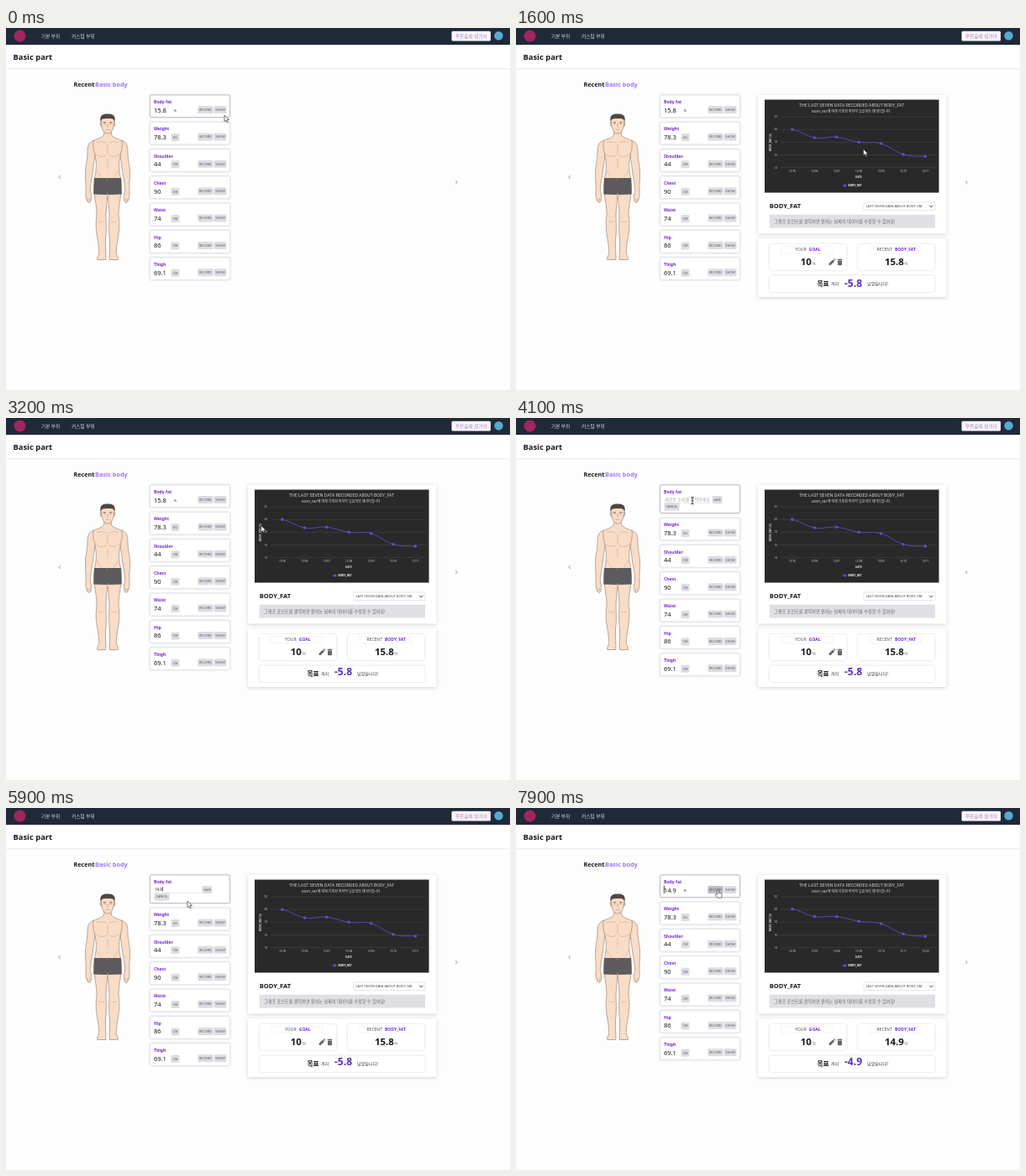
Recreate the animation shown at these times as an HTML page. Size 600 by 432 pixels, loop 8 s.

```html
<!DOCTYPE html>
<html lang="ko">
<head>
<meta charset="utf-8">
<title>Basic part</title>
<style>
html, body { margin: 0; width: 100%; height: 100%; overflow: hidden; background: #fdfdfe; }
svg { display: block; }
text { font-family: 'Noto Sans', 'Noto Sans CJK KR', 'Noto Sans CJK', sans-serif; white-space: pre; }
.b { font-weight: 700; }
.sb { font-weight: 600; }
.m { text-anchor: middle; }
.e { text-anchor: end; }
.n { font-family: Roboto, 'Noto Sans CJK KR', 'Noto Sans CJK', sans-serif; }
.soft { filter: drop-shadow(0 .5px 1px rgba(40, 40, 70, .22)); }
.deep { filter: drop-shadow(0 1px 2px rgba(40, 40, 70, .2)); }
.man { stroke: #9b8878; stroke-width: .7; fill: #f9dcc6; stroke-linejoin: round; }
.line { fill: none; stroke: #b99c87; stroke-width: .5; }
</style>
</head>
<body>
<svg id="stage" width="600" height="432" viewBox="0 0 600 432"></svg>
<script>
const LOOP = 8000, STEP = 100;
const OPEN = 1000, RESCALE = 1100, EDIT = 3800, FOCUS = 4300, SAVED = 7900;
const PURPLE = '#6d28d9', INK = '#17171c';

const rect = (x, y, w, h, fill, more = '') =>
  `<rect x="${x}" y="${y}" width="${w}" height="${h}" fill="${fill}" ${more}/>`;
const text = (x, y, size, str, fill = INK, cls = '', more = '') =>
  `<text x="${x}" y="${y}" font-size="${size}" fill="${fill}" class="${cls}" ${more}>${str}</text>`;
const stroke = (d, color, w = 1) =>
  `<path d="${d}" fill="none" stroke="${color}" stroke-width="${w}"/>`;
const pill = (x, y, w, label, id = '') =>
  rect(x, y, w, 9, '#dcdce2', `rx="1.5" ${id && `id="${id}"`}`) +
  text(x + w / 2, y + 5.9, 3.8, label, '#55555e', 'm');

function header() {
  return rect(0, 20, 600, 28, '#fff', 'class="soft"') +
    rect(0, 0, 600, 20, '#1f2937') +
    '<circle cx="16.5" cy="9.5" r="7" fill="#a1265e"/>' +
    text(42, 11.7, 5.6, '기본 부위', '#d6d9df') +
    text(78, 11.7, 5.7, '커스텀 부위', '#d6d9df') +
    rect(530.5, 3.7, 46.5, 11.8, '#fbf6fd', 'rx="1.5"') +
    text(553.8, 11.7, 5.7, '푸른숲에 살거야', '#a58bb8', 'm') +
    '<circle cx="586.5" cy="9.3" r="5.2" fill="#58aad2"/>' +
    text(8.5, 37.8, 9.4, 'Basic part', INK, 'sb') +
    text(80.5, 69.6, 7.2, 'Recent', INK, 'b') +
    text(106, 69.6, 7.3, 'Basic body', '#a078f0', 'b') +
    stroke('M64.8 175.8L62.8 178L64.8 180.2', '#777', .7) +
    stroke('M535.2 182L537.2 184.2L535.2 186.4', '#777', .7);
}

function man() {
  const half = `
    <path class="man" d="M105 134C98 136 97 141 97 148C97 158 94.5 164 94.5 172C94.5 182 95.5 188 95 194C94.5 200 95.5 207 99 208.5C101.5 208 102 203 101.5 199C100.5 196 100 193 100.5 190C101 182 103.5 174 104 166C104.5 160 106 155 106 150Z"/>
    <path class="man" d="M105 196C106 206 108 214 108 222C107 232 106.5 240 109 252C110.5 262 111 267 110.5 270C109 273 108 275 108.8 276.5L118.8 276.5C119.2 270 118 262 118.5 252C120 240 119 232 119 222C119.5 212 120.5 204 121 198Z"/>
    <path class="man" d="M121.4 121H117L116.5 128C113 131.5 108 132.5 104 134.5C103 142 105 148 106 152C108 160 107.5 168 106.5 174L105 182H121.4"/>
    <path d="M105 179H121.4V196L120 199L104.3 198.5C104 190 104.5 184 105 179Z" fill="#5c5a5c"/>
    <path class="line" d="M119.5 137C116 135.5 112 135.5 108 136.5M106.5 150C110 154 116 154 119.6 152M108 170C110 174 112 176 114 178M110 230C112 232.5 115 232.5 117 230M97.5 203V207M99.5 203V207"/>
    <path class="man" d="M113.4 112C111.6 111.5 111.8 117 113.9 117.6Z"/>`;
  return half + `<g transform="matrix(-1 0 0 1 242 0)">${half}</g>` +
    '<path class="line" d="M121 139V151M121 156V166M120.3 172.5H121.7"/>' +
    '<path class="man" d="M113.2 108C113 118 115.5 126 121 126S129 118 128.8 108C127 104 115 104 113.2 108Z"/>' +
    '<path d="M112.7 112C111 104 115 102.5 121 102.5S131 104 129.3 112C128.5 108.5 127 108 121 108S113.5 108.5 112.7 112Z" fill="#51473f"/>' +
    stroke('M115.5 112.6H119M123 112.6H126.5', '#5d4c40', .7) +
    stroke('M116.6 114.2H118.4M123.6 114.2H125.4', '#6a5648', .7) +
    stroke('M121 114V118H122M118.6 121.4H123.4', '#b58c74', .6);
}

const parts = [['Weight', '78.3', 'KG'], ['Shoulder', '44'], ['Chest', '90'],
  ['Waist', '74'], ['Hip', '86'], ['Thigh', '69.1']];

function card([name, value, unit = 'CM'], i) {
  const y = 112.3 + i * 32.35;
  return rect(171.5, y, 95, 26.5, '#fff', 'rx="1.5" stroke="#dedee6" stroke-width=".6" class="soft"') +
    text(176, y + 10, 5.1, name, PURPLE, 'sb') +
    text(176, y + 20.6, 7.5, value) +
    pill(196.5, y + 13.7, 10, unit) + pill(228.3, y + 13.2, 18.3, 'RECORD') +
    pill(247.5, y + 13.2, 15, 'SHOW');
}

function fatCard() {
  return rect(171.5, 80, 95, 26.5, '#fff', 'id="fat" rx="1.5" stroke-width=".7" class="soft"') +
    text(176, 90, 5.1, 'Body fat', PURPLE, 'sb') +
    '<g id="view">' + text(176, 100.7, 7.5, '15.8', INK, '', 'id="fatValue"') +
    text(201.5, 99.5, 4, '%', INK, 'm') +
    pill(228.3, 93, 18.3, 'RECORD', 'record') + pill(247.5, 93, 15, 'SHOW', 'show') +
    stroke('M176.3 92.5V102', '#111', 0).replace('<path', '<path id="ghost"') + '</g>' +
    '<g id="edit">' + text(177, 98.8, 5.1, '', '#a5a5ae', '', 'id="input"') +
    stroke('M176 101.3H232', '#c9c9d0', .5) + rect(0, 94, .6, 5.6, '#111', 'id="caret"') +
    pill(233.5, 93, 12, 'SAVE', 'save') + pill(176.5, 101.5, 18, 'CANCEL') + '</g>';
}

function chart() {
  return rect(296, 85.5, 207.5, 111, '#292929') +
    text(399.5, 93.6, 5.2, 'THE LAST SEVEN DATA RECORDED ABOUT BODY_FAT', '#cfcfcf', 'm n') +
    text(399.5, 101.3, 4, 'BODY_FAT에 대해 기록된 마지막 일곱개의 데이터입니다.', '#dedede', 'm n') +
    '<g id="axes"></g>' +
    text(0, 0, 3.3, 'BODY_FAT (%)', '#ddd', 'm n b', 'transform="translate(304.2 136.5) rotate(-90)"') +
    text(408, 179, 3.2, 'DATE', '#ddd', 'm n b') +
    '<path id="curve" fill="none" stroke="#5b45b0" stroke-width="1"/><g id="dots" fill="#6a48c8"></g>' +
    stroke('M388.6 188H394', '#5b45b0') + '<circle cx="391.3" cy="188" r="1.7" fill="#6a48c8"/>' +
    text(395.5, 189.3, 3.4, 'BODY_FAT', '#fff', 'b n') +
    '<g id="tip">' + rect(429, 124.5, 36, 13.5, '#000', 'rx="1.5"') +
    text(431.5, 130, 3.2, '12/09', '#fff', 'n') +
    '<circle cx="432.6" cy="133.9" r="1" fill="#6a48c8"/>' +
    text(435, 135.1, 3.4, 'BODY_FAT: 17.8 %', '#fff', 'n') + '</g>';
}

function panels() {
  const box = (x, y, w, h) => rect(x, y, w, h, '#fff', 'rx="3" class="soft"');
  const tab = x => rect(x, 260.5, 62, 8.5, '#fff', 'rx="1" stroke="#e6e6ec" stroke-width=".5"');
  return rect(288, 80, 224.5, 165.5, '#fff', 'rx="1" class="deep"') +
    rect(288, 251.5, 224.5, 69.5, '#fff', 'rx="1" class="deep"') + chart() +
    text(301.8, 215.4, 7.5, 'BODY_FAT', INK, 'b') +
    rect(414, 208, 85, 9.6, '#fff', 'rx="1" stroke="#c8c8d0" stroke-width=".5"') +
    text(416.5, 214.3, 4, 'LAST SEVEN DATA ABOUT BODY_FAT', '#444') +
    stroke('M492.2 211.8L494.2 213.8L496.2 211.8', '#222', .9) +
    rect(301.7, 222.7, 197.3, 15.8, '#dfdfe4') +
    text(307, 232.5, 5.15, '그래프 포인트를 클릭하면 원하는 날짜의 데이터를 수정할 수 있어요!', '#66666e') +
    box(301.7, 258, 91.8, 31) + box(407, 258, 91.6, 31) + box(301.7, 295.5, 197, 19.5) +
    tab(315) + tab(421) +
    text(332, 266.4, 5.1, 'YOUR', '#555') + text(348.8, 266.4, 5, 'GOAL', PURPLE, 'b') +
    text(429.5, 266.4, 5, 'RECENT', '#555') + text(451, 266.4, 5, 'BODY_FAT', PURPLE, 'b') +
    text(338.8, 283, 11.4, '10', INK, 'b') + text(352.6, 282.6, 5.2, '%', '#888') +
    text(439, 283, 11.4, '15.8', INK, 'b', 'id="recent"') + text(462.3, 282.6, 5.2, '%', '#888') +
    '<path d="M372.6 283V281L377.2 276.4L379.2 278.4L374.6 283ZM377.8 275.8L378.6 275L380.6 277L379.8 277.8Z" fill="#666"/>' +
    '<path d="M382.6 276H384.2L384.8 275.4H386.4L387 276H388.4V277H382.6ZM383 277.6H388V282.4Q388 283.2 387.2 283.2H383.8Q383 283.2 383 282.4Z" fill="#666"/>' +
    text(358.4, 307.6, 7.8, '목표', INK, 'b') + text(375, 307, 5, '까지', '#333') +
    '<g id="bounce">' + text(391, 311, 12, '-5.8', '#5b2bc0', 'b', 'id="gap"') + '</g>' +
    text(418, 307.3, 5.1, '남았습니다!', '#333');
}

const cursors = {
  arrow: '<path d="M0 0V7.6L1.8 6L3 8.7L4.3 8.1L3.1 5.5H5.5Z" fill="#fff" stroke="#222" stroke-width=".6"/>',
  hand: '<path d="M-.9 6V.6Q0-.6 .9 .6V4L4 4.6Q4.9 5 4.7 6.2L4 9.8H-.6L-3 6.6Q-3.2 5.2-2 5.4Z" fill="#fff" stroke="#222" stroke-width=".6"/>',
  beam: '<path d="M-1.7-4Q-.2-4 0-3.4Q.2-4 1.7-4M0-3.4V3.6M-1.7 4.2Q-.2 4.2 0 3.6Q.2 4.2 1.7 4.2" fill="none" stroke="#222" stroke-width=".9"/>'
};

document.getElementById('stage').innerHTML = header() + man() + fatCard() +
  `<g id="rest">${parts.map(card).join('')}</g><g id="panels">${panels()}</g><g id="cursor"></g>`;
const $ = id => document.getElementById(id);
const show = (id, on) => $(id).setAttribute('visibility', on ? 'inherit' : 'hidden');
const set = (id, attr, v) => $(id).setAttribute(attr, v);

// time, x, y, shape
const path = [
  [0, 260, 104, 'arrow'], [400, 254, 97, 'hand'], [1200, 254, 97, 'arrow'],
  [1700, 432, 150, 'arrow'], [2000, 458, 152, 'arrow'], [2400, 420.5, 178.5, 'arrow'],
  [2800, 405, 176, 'arrow'], [3500, 238, 97.5, 'hand'], [3900, 238, 97.5, 'beam'],
  [4100, 210, 98.5, 'beam'], [4900, 210, 98.5, 'beam'], [5400, 216, 111, 'arrow'],
  [6300, 216, 111, 'arrow'], [6900, 240.5, 97.3, 'hand'], [LOOP, 240.5, 97.3, 'hand']
];
const typed = [[5300, '1'], [5500, '14'], [5700, '14.'], [5800, '14.9']];

const values = [20, 18.7, 18.8, 18, 17.8, 16.1, 15.8];
const next = [...values.slice(1), 14.9];
const px = i => 329 + i * 26.4;
const py = (v, lo, hi) => 166.6 - (v - lo) / (hi - lo) * 60.6;
const outQuart = p => 1 - (1 - Math.min(1, Math.max(0, p))) ** 4;
const mix = (a, b, p) => a + (b - a) * p;

function drawAxes(lo, hi, step, days) {
  let out = '';
  for (let v = lo; v <= hi; v += step) {
    const y = py(v, lo, hi);
    out += stroke(`M315 ${y}H500.5`, '#555', .4) + text(311, y + 1.1, 3.1, v, '#ccc', 'e n');
  }
  days.forEach((d, i) => {
    out += text(px(i), 172.3, 3.1, '12/' + String(d).padStart(2, '0'), '#ccc', 'm n');
  });
  $('axes').innerHTML = out;
}

function drawChart(t) {
  const early = t < RESCALE, done = t >= SAVED;
  const days = done ? [6, 7, 8, 9, 10, 11, 20] : [5, 6, 7, 8, 9, 10, 11];
  early ? drawAxes(15, 21, 1, days) : drawAxes(14, 22, 2, days);
  const settle = early ? 0 : outQuart((t - RESCALE + 50) / 1000);
  const ys = values.map((v, i) => {
    const y = mix(py(v, 15, 21), py(v, 14, 22), settle);
    return done ? mix(y, py(next[i], 14, 19), outQuart((t - SAVED + 16) / 1000)) : y;
  });
  const slope = i => (ys[Math.min(6, i + 1)] - ys[Math.max(0, i - 1)]) * .2;
  let d = `M${px(0)} ${ys[0]}`;
  for (let i = 1; i < 7; i++)
    d += `C${px(i - 1) + 10.5} ${ys[i - 1] + slope(i - 1)} ${px(i) - 10.5} ${ys[i] - slope(i)} ${px(i)} ${ys[i]}`;
  set('curve', 'd', d);
  const hot = t >= 1900 && t < 2800 ? 5 : -1;
  $('dots').innerHTML = ys.map((y, i) =>
    `<circle cx="${px(i)}" cy="${y}" r="${i === hot ? 2.4 : 1.8}"/>`).join('');
  show('tip', t >= 1900 && t < 2700);
}

function drawCursor(t) {
  const i = path.findIndex((k, n) => n + 1 === path.length - 1 || t < path[n + 1][0]);
  const a = path[i], b = path[i + 1];
  const p = Math.min(1, (t - a[0]) / (b[0] - a[0])), s = p * p * (3 - 2 * p);
  const x = mix(a[1], b[1], s), y = mix(a[2], b[2], s);
  $('cursor').innerHTML = cursors[a[3]];
  set('cursor', 'transform', `translate(${x} ${y})`);
  return { x, y, hand: a[3] === 'hand' };
}

const bounce = $('bounce').animate([
  { transform: 'translateY(-4px)', easing: 'cubic-bezier(.8,0,1,1)' },
  { transform: 'translateY(0)', easing: 'cubic-bezier(0,0,.2,1)' },
  { transform: 'translateY(-4px)' }
], { duration: 1000, iterations: Infinity });
bounce.pause();

function render(t) {
  const editing = t >= EDIT && t < SAVED, saved = t >= SAVED;
  const c = drawCursor(t);
  const over = c.x > 171 && c.x < 267 && c.y > 80 && c.y < (editing ? 113.5 : 106.5);
  set('fat', 'stroke', over ? '#a9a9b6' : '#dedee6');
  set('fat', 'height', editing ? 33.4 : 26.5);
  set('rest', 'transform', `translate(0 ${editing ? 7 : 0})`);
  show('view', !editing);
  show('edit', editing);
  set('ghost', 'stroke-width', saved ? .8 : 0);
  set('show', 'fill', c.hand && c.x > 247 ? '#bcbcc6' : '#dcdce2');
  for (const id of ['record', 'save'])
    set(id, 'fill', c.hand && c.x < 247 ? '#bcbcc6' : '#dcdce2');

  const entry = typed.filter(k => t >= k[0]).pop();
  const input = $('input');
  input.textContent = entry ? entry[1] : '새로운 수치를 입력하세요';
  set('input', 'fill', entry ? INK : '#a5a5ae');
  set('input', 'font-size', entry ? 4.5 : 5.1);
  const focused = editing && t >= FOCUS && t < 7200;
  const blink = t >= 5300 && t < 6300 || Math.floor((t - FOCUS) / 500) % 2 === 0;
  show('caret', focused && blink);
  set('caret', 'x', 177 + (entry ? input.getComputedTextLength() : 0));

  show('panels', t >= OPEN);
  $('fatValue').textContent = $('recent').textContent = saved ? '14.9' : '15.8';
  $('gap').textContent = saved ? '-4.9' : '-5.8';
  if (t >= OPEN) drawChart(t);
  else show('tip', false);
  bounce.currentTime = t % 1000;
}

const start = performance.now();
let last = -1;
function tick() {
  const t = Math.floor((performance.now() - start) % LOOP / STEP) * STEP;
  if (t !== last) render(last = t);
  requestAnimationFrame(tick);
}
render(0);
tick();
</script>
</body>
</html>
```
